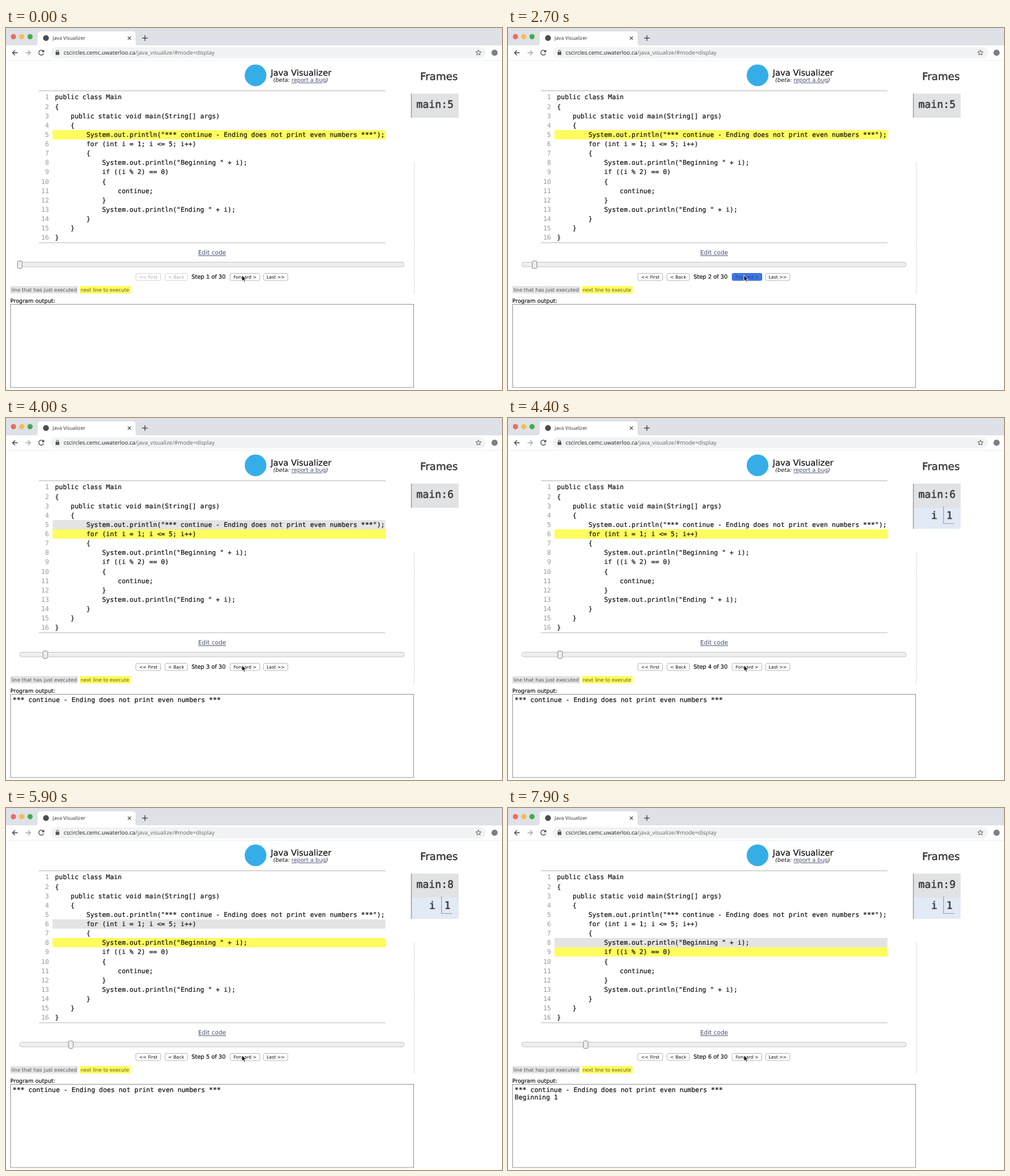
Recreate the animation shown at these times as an HTML page. Size 800x585 px, loop 8 s.

```html
<!DOCTYPE html>
<html lang="en">
<head>
<meta charset="utf-8">
<title>Java Visualizer</title>
<style>
  html, body { margin: 0; width: 100%; height: 100%; overflow: hidden; background: #fff; }
  svg { display: block; width: 800px; height: 585px; }
  text { text-rendering: geometricPrecision; white-space: pre; fill: #111; }
  .ui { font-family: "DejaVu Sans", sans-serif; }
  .bar { font-family: "Open Sans", sans-serif; }
  .mono { font-family: "DejaVu Sans Mono", monospace; }
  .firm { stroke: #111; stroke-width: .2; }
  .panel { fill: #333; stroke: #333; stroke-width: .4; }
  .link { fill: #46506e; text-decoration: underline; }
</style>
</head>
<body>
<svg id="stage" viewBox="0 0 800 585" xmlns="http://www.w3.org/2000/svg"></svg>
<script>
const NS = "http://www.w3.org/2000/svg";
const stage = document.getElementById("stage");
const LOOP = 8000, PRESS = 300;
const YELLOW = "#fffc5e", GREY = "#e4e4e4", CODE_SIZE = 10.52;

// at: start time, done/next: highlighted lines, hold: length of the press before it
const steps = [
  { at: 0,    next: 5 },
  { at: 1400, next: 5 },
  { at: 3000, done: 5, next: 6, out: 1 },
  { at: 4400, next: 6, out: 1, i: 1 },
  { at: 5900, done: 6, next: 8, out: 1, i: 1 },
  { at: 7900, done: 8, next: 9, out: 2, i: 1, hold: 500 }
];

const code = [
  "public class Main",
  "{",
  "    public static void main(String[] args)",
  "    {",
  "        System.out.println(\"*** continue - Ending does not print even numbers ***\");",
  "        for (int i = 1; i <= 5; i++)",
  "        {",
  "            System.out.println(\"Beginning \" + i);",
  "            if ((i % 2) == 0)",
  "            {",
  "                continue;",
  "            }",
  "            System.out.println(\"Ending \" + i);",
  "        }",
  "    }",
  "}"
];

function add(tag, attrs, parent = stage) {
  const el = document.createElementNS(NS, tag);
  for (const k in attrs) el.setAttribute(k, attrs[k]);
  parent.appendChild(el);
  return el;
}
const rect = (x, y, w, h, fill, more) =>
  add("rect", { x, y, width: w, height: h, fill, ...more });
const circle = (cx, cy, r, fill) => add("circle", { cx, cy, r, fill });
const path = (d, stroke, width = 1, more) =>
  add("path", { d, stroke, "stroke-width": width, fill: "none", ...more });
function text(x, y, size, str, cls = "ui", more) {
  const el = add("text", { x, y, "font-size": size, class: cls, ...more });
  el.textContent = str;
  return el;
}
const show = (el, on) => el.setAttribute("visibility", on ? "visible" : "hidden");

// Browser window
rect(0, 0, 800, 28, "#dee1e6");
["#ee6a5f", "#f5bd4f", "#3fae49"].forEach((c, n) => circle(12 + 13.4 * n, 14, 4.2, c));
path("M47 28 Q51 28 51 24 V10 Q51 5.500 56 5.500 H204 Q209 5.500 209 10 V24 Q209 28 213 28 Z",
  "none", 0, { fill: "#fff" });
circle(64.5, 16.3, 4.7, "#4a4d51");
text(75, 19.3, 8.05, "Java Visualizer", "bar", { style: "fill:#333" });
path("M196.500 13.800 l5 5 m0 -5 l-5 5", "#444", 1.1);
path("M219.500 16.300 h9 m-4.500 -4.500 v9", "#444", 1.3);
path("M18.800 40 H10.500 m4 -4 l-4 4 l4 4", "#4a4d51", 1.3);
path("M31.500 40 H39.500 m-4 -4 l4 4 l-4 4", "#a9abae", 1.3);
path("M60.300 37.600 A4 4 0 1 0 60.700 41.300 M61 35.500 v3 h-3", "#4a4d51", 1.3);
rect(72, 31, 702, 18, "#f1f3f4", { rx: 9 });
rect(80, 38.5, 6, 5, "#555", { rx: .6 });
path("M81.300 39 v-1.500 a1.700 1.700 0 0 1 3.400 0 v1.500", "#555", 1);
const url = text(93, 43, 9, "cscircles.cemc.uwaterloo.ca", "bar");
url.style.fill = "#222";
const tail = add("tspan", {}, url);
tail.textContent = "/java_visualize/#mode=display";
tail.style.fill = "#666";
let star = "";
for (let n = 0; n < 10; n++) {
  const a = Math.PI * n / 5 - Math.PI / 2, r = n % 2 ? 2 : 4.5;
  star += (n ? "L" : "M") + (762 + r * Math.cos(a)).toFixed(2) + " " + (40 + r * Math.sin(a)).toFixed(2);
}
path(star + "Z", "#555", .9);
circle(788, 40, 5, "#7d8083");
path("M0 52.500 H800", "#e4e5e7", .6);

// Page heading
circle(402.5, 76.5, 17.5, "#35aee8");
text(427, 76.6, 13.5, "Java Visualizer", "ui firm");
const beta = text(431, 87.3, 8.95, "(beta: ", "ui", { "font-style": "italic" });
const report = add("tspan", { class: "link", "font-style": "normal" }, beta);
report.textContent = "report a bug";
add("tspan", {}, beta).textContent = ")";

// Code listing
const ROW = 15.13;
const rowTop = n => Math.round(164.7 + (n - 5) * ROW);
const doneBar = rect(75, 0, 537, 15, GREY);
const nextBar = rect(75, 0, 537, 15, YELLOW);
path("M53 101.500 H612 M53 347 H612", "#b8b8b8");
code.forEach((line, n) => {
  const y = 115.4 + n * ROW;
  text(69.3, y, CODE_SIZE, n + 1, "mono", { "text-anchor": "end", style: "fill:#999" });
  const body = line.trimStart();
  text(79 + (line.length - body.length) * 6.335, y, CODE_SIZE, body, "mono firm");
});
text(310, 366.4, 9.65, "Edit code", "ui link");

// Slider and buttons
rect(22.5, 378.5, 619.5, 7.5, "#efefef", { rx: 3, stroke: "#c2c2c2", "stroke-width": .9 });
const knob = rect(18.5, 376.5, 7.5, 12, "#eee", { rx: 2, stroke: "#8e8e8e", "stroke-width": 1 });

function button(x, w, str) {
  const box = rect(x + .5, 396.5, w - 1, 11.5, "#fff", { rx: 2, "stroke-width": .9 });
  const label = text(x + w / 2, 404.8, 7.2, str, "ui", { "text-anchor": "middle" });
  return (fill, stroke, ink) => {
    box.setAttribute("fill", fill);
    box.setAttribute("stroke", stroke);
    label.style.fill = ink;
  };
}
const first = button(209, 41, "<< First");
const back = button(256, 37, "< Back");
const forward = button(361, 49, "Forward >");
button(415, 40, "Last >>")("#fff", "#b5b5b5", "#111");
const counter = text(299.3, 405, 9, "", "ui firm");

// Legend and output
rect(7, 417, 109, 12, GREY);
rect(119, 417, 82, 12, YELLOW);
text(8.7, 425.8, 7.94, "line that has just executed", "ui", { style: "fill:#555" });
text(120.2, 425.8, 7.9, "next line to execute", "ui", { style: "fill:#5c5c30" });
text(7, 444.2, 8.9, "Program output:", "ui firm");
rect(7.5, 446.5, 650, 134.5, "#fff", { stroke: "#999" });
const output = ["*** continue - Ending does not print even numbers ***", "Beginning 1"]
  .map((s, n) => text(10.8, 459.3 + 12 * n, CODE_SIZE, s, "mono firm"));

// Frames panel
path("M658.500 217 V430", "#ccc", 1, { "stroke-dasharray": "1.5 1" });
text(668, 84, 16.7, "Frames", "ui panel");
rect(653, 106, 77, 39, "#e1e2e4");
const varRow = rect(653, 145, 77, 34, "#e1eaf5");
const edge = rect(653, 106, 1.6, 39, "#a6a9ae");
const frameName = text(662, 129, 16.6, "", "mono panel");
const vars = [
  varRow,
  text(682.5, 162.5, 16.6, "i", "mono panel"),
  text(707, 162.5, 16.6, "1", "mono panel"),
  path("M702.500 143 V170.500 H720", "#a0a4aa", 1.2)
];

// Pointer
path("M380.500 399.500 V409 L382.700 407 L384.200 410.300 L385.900 409.500 L384.400 406.400 H387.300 Z",
  "#fff", .8, { fill: "#111", "stroke-linejoin": "round" });

function draw(t) {
  let n = steps.length - 1;
  while (steps[n].at > t) n--;
  const s = steps[n], after = steps[n + 1];
  const pressed = after && t >= after.at - (after.hold || PRESS);

  show(doneBar, s.done);
  if (s.done) doneBar.setAttribute("y", rowTop(s.done));
  nextBar.setAttribute("y", rowTop(s.next));
  knob.setAttribute("x", 18.5 + n * 20.6);
  counter.textContent = `Step ${n + 1} of 30`;
  frameName.textContent = "main:" + s.next;
  vars.forEach(el => show(el, s.i));
  edge.setAttribute("height", s.i ? 73 : 39);
  output.forEach((el, k) => show(el, k < (s.out || 0)));

  const idle = n ? ["#fff", "#b5b5b5", "#111"] : ["#fff", "#d4d4d4", "#aaa"];
  first(...idle);
  back(...idle);
  forward(...(pressed ? ["#3f76e4", "#3566cc", "#1c4a80"] : ["#fff", "#b5b5b5", "#111"]));
}

const start = performance.now();
function tick(now) {
  draw(Math.max(0, now - start) % LOOP);
  requestAnimationFrame(tick);
}
draw(0);
requestAnimationFrame(tick);
</script>
</body>
</html>
```
